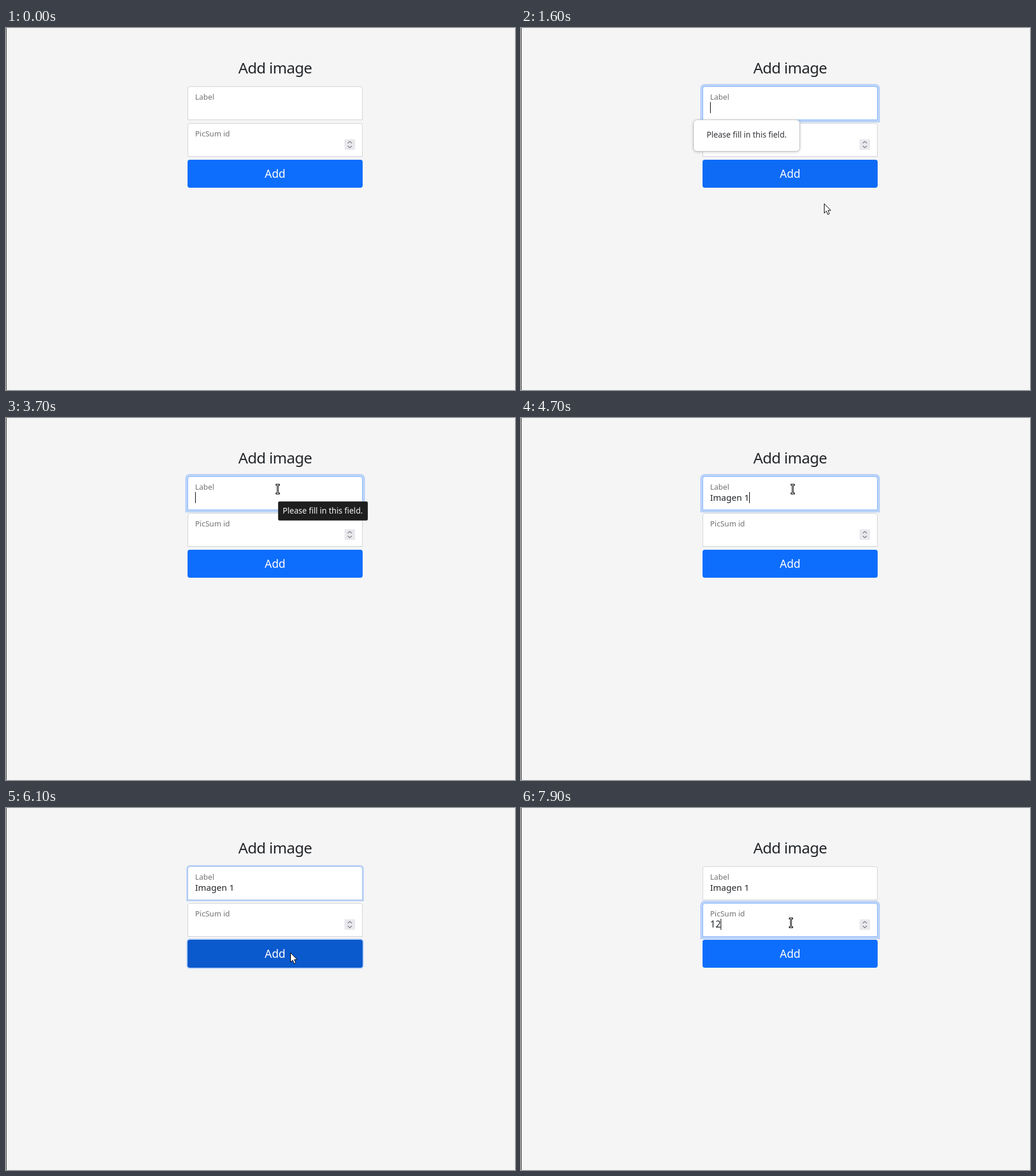
These frames come from a looping animation (872x621 px, 8000 ms). An HTML page:

```html
<!DOCTYPE html>
<html lang="en">
<head>
<meta charset="utf-8">
<title>Add image</title>
<style>
  html, body { margin: 0; width: 100%; height: 100%; overflow: hidden; background: #f5f5f5; }
  svg { display: block; width: 872px; height: 621px; }
  text { font: 13px "Noto Sans", "Open Sans", sans-serif; font-variant-ligatures: none; white-space: pre; }
  .title { font-size: 26px; letter-spacing: -.6px; fill: #212529; text-anchor: middle; }
  .label { fill: #6f7174; }
  .value { font-size: 15px; fill: #212529; }
  .add { font-size: 19px; fill: #fff; text-anchor: middle; }
  .hint { font-size: 13.6px; }
  .box { fill: #fff; }
  .ring { fill: #0d6efd; fill-opacity: .25; }
  .spin { fill: none; stroke: #777782; stroke-width: 1.2; }
  .bubble { filter: drop-shadow(0 1px 2px rgba(0, 0, 0, .2)); }
  .bubble rect { fill: #fff; stroke: #c3c3cb; }
  .bubble text { fill: #34343b; }
</style>
</head>
<body>
<svg viewBox="0 0 872 621">
  <rect width="872" height="621" fill="#f5f5f5"/>
  <rect width="1" height="621" fill="#333"/>
  <text class="title" x="461" y="78">Add image</text>

  <path class="ring" id="labelRing"/>
  <path class="ring" id="numRing"/>
  <rect class="ring" id="btnRing"/>

  <path class="box" id="labelBox"/>
  <text class="label" x="324" y="123">Label</text>
  <text class="value" id="labelText" x="324" y="142"></text>
  <rect id="labelCaret" y="127" width="1" height="19"/>

  <path class="box" id="numBox"/>
  <text class="label" x="324" y="186">PicSum id</text>
  <text class="value" id="numText" x="324" y="205" style="font-size:16px"></text>
  <rect id="numCaret" y="190" width="1" height="19"/>
  <rect x="580" y="191" width="18" height="18" rx="1" fill="#e9e9ed"/>
  <path class="spin" d="M585.5 197.8L589 194.5L592.5 197.8M585.5 202.2L589 205.5L592.5 202.2"/>

  <rect id="btn" x="311" y="226" width="300" height="48" rx="4"/>
  <text class="add" x="461" y="257">Add</text>

  <g id="bubble" class="bubble">
    <rect x="295.5" y="157.5" width="182" height="54" rx="6"/>
    <text class="hint" x="318" y="188">Please fill in this field.</text>
  </g>
  <g id="tip">
    <rect x="466.5" y="143.5" width="153" height="32" rx="2" fill="#1e1e1e" stroke="#42453e"/>
    <text class="hint" x="474" y="164" fill="#f5f5f5">Please fill in this field.</text>
  </g>

  <g id="cursor">
    <path id="arrow" fill="#fff" stroke="#000" stroke-linejoin="round"
      d="M.5 .5V16.5L4.2 13.1L6.7 18.9L9.4 17.7L6.9 12H11.8Z"/>
    <g id="beam" fill="none" stroke-linecap="square">
      <path stroke="#000" stroke-width="3" d="M-1.5 -7.5H2.5M.5 -7.5V7.5M-1.5 7.5H2.5"/>
      <path stroke="#fff" d="M-1.5 -7.5H2.5M.5 -7.5V7.5M-1.5 7.5H2.5"/>
    </g>
  </g>
</svg>
<script>
const LOOP = 8000, STEP = 100, FADE = 200;
const LEFT = 311, WIDTH = 300, FIELD_H = 58, BTN_Y = 226, BTN_H = 48;
const $ = id => document.getElementById(id);

// Pointer legs: start and end time, then the point reached.
const entry = [540, 606];
const legs = [
  [200, 800, 497, 252], [1300, 1900, 528, 321], [2300, 2800, 466, 124], [2800, 3200, 465, 122],
  [5200, 5700, 480, 363], [5700, 6100, 487, 248], [6700, 7200, 462, 182], [7200, 7900, 462, 197]
];

// Spans of time in which each thing is active.
const bubbleOn = [[1000, 2300], [6200, 6900]];
const pressed = [[900, 1000], [6000, 6100]];
const fields = {
  label: { y: 100, text: "Imagen 1", bursts: [[3800, 1], [4000, 3], [4400, 4]],
           focus: [[1000, 2400], [3000, 6000]], caret: [[1100, 2200], [3100, 5300]] },
  num: { y: 163, text: "12", bursts: [[7800, 2]],
         focus: [[6200, LOOP]], caret: [[6300, 7600], [7800, LOOP]] }
};

const clamp = v => Math.min(1, Math.max(0, v));
const within = (v, a, b) => v >= a && v < b;
const inAny = (t, spans) => spans.some(([a, b]) => within(t, a, b));
const fade = (t, spans) => spans.reduce((s, [a, b]) => s + clamp((t - a) / FADE) - clamp((t - b) / FADE), 0);
const mix = (a, b, k) => `rgb(${a.map((v, i) => Math.round(v + (b[i] - v) * k))})`;
const set = (el, attrs) => { for (const k in attrs) el.setAttribute(k, attrs[k]); };
const show = (el, on) => { el.style.display = on ? "" : "none"; };

function pointer(t) {
  let [x, y] = entry;
  for (const [a, b, toX, toY] of legs) {
    const k = Math.sin(clamp((t - a) / (b - a)) * Math.PI / 2);
    x += (toX - x) * k;
    y += (toY - y) * k;
  }
  return [Math.round(x), Math.round(y)];
}

const over = ([x, y], top, h) => within(x, LEFT, LEFT + WIDTH) && within(y, top, top + h);

// The second bubble captures the pointer, so the button stays plain beneath it.
function hover(t) {
  let hits = 0;
  for (let i = 0; i < 5; i++) {
    const s = t - i * 50;
    if (s < bubbleOn[1][0] && over(pointer(s), BTN_Y, BTN_H)) hits++;
  }
  return hits / 5;
}

function buttonColor(level) {
  const blue = [13, 110, 253], dark = [11, 94, 215], down = [10, 88, 202];
  return level <= 1 ? mix(blue, dark, level) : mix(dark, down, Math.min(1, level - 1));
}

// Field outline with rounded top corners and square bottom ones.
function outline(y, grow) {
  const x = LEFT - grow, r = 4 + Math.max(0, grow), w = WIDTH + 2 * grow;
  return `M${x} ${y + FIELD_H + grow}V${y - grow + r}a${r} ${r} 0 0 1 ${r} ${-r}` +
    `h${w - 2 * r}a${r} ${r} 0 0 1 ${r} ${r}V${y + FIELD_H + grow}Z`;
}

function drawField(name, t) {
  const f = fields[name], glow = fade(t, f.focus), text = $(name + "Text");
  show($(name + "Ring"), glow > 0);
  set($(name + "Ring"), { d: outline(f.y, 4 * glow) });
  set($(name + "Box"), { d: outline(f.y, -.5), stroke: mix([206, 209, 213], [134, 183, 254], glow) });

  const typed = f.bursts.reduce((n, [from, size]) => n + size * clamp(Math.floor((t - from) / STEP + 1) / size), 0);
  text.textContent = f.text.slice(0, Math.round(typed));
  const width = typed ? text.getComputedTextLength() : 0;
  set($(name + "Caret"), { x: 324 + Math.round(width) });
  show($(name + "Caret"), inAny(t, f.caret));
}

function drawButton(t) {
  const glow = fade(t, pressed), grow = 4 * glow;
  const down = pressed.some(([a, b]) => within(t, a + STEP, b + STEP)) || inAny(t, pressed);
  set($("btn"), { fill: buttonColor(hover(t) + (down ? 1 : 0)) });
  show($("btnRing"), glow > 0);
  set($("btnRing"), { x: LEFT - grow, y: BTN_Y - grow, width: WIDTH + 2 * grow, height: BTN_H + 2 * grow, rx: 4 + grow });
}

function draw(t) {
  for (const name in fields) drawField(name, t);
  drawButton(t);

  const second = t >= bubbleOn[1][0];
  set($("bubble"), { opacity: fade(t, bubbleOn), transform: `translate(0 ${second ? fields.num.y - fields.label.y : 0})` });
  show($("tip"), within(t, 3700, 3800));

  const at = pointer(t);
  const onText = Object.values(fields).some(f => over(at, f.y, FIELD_H));
  show($("cursor"), t >= legs[0][0]);
  set($("cursor"), { transform: `translate(${at})` });
  show($("arrow"), !onText);
  show($("beam"), onText);
}

const start = performance.now();
let last = -1;
function tick() {
  const t = Math.floor((performance.now() - start) % LOOP / STEP) * STEP;
  if (t !== last) draw(last = t);
  requestAnimationFrame(tick);
}
tick();
</script>
</body>
</html>
```
